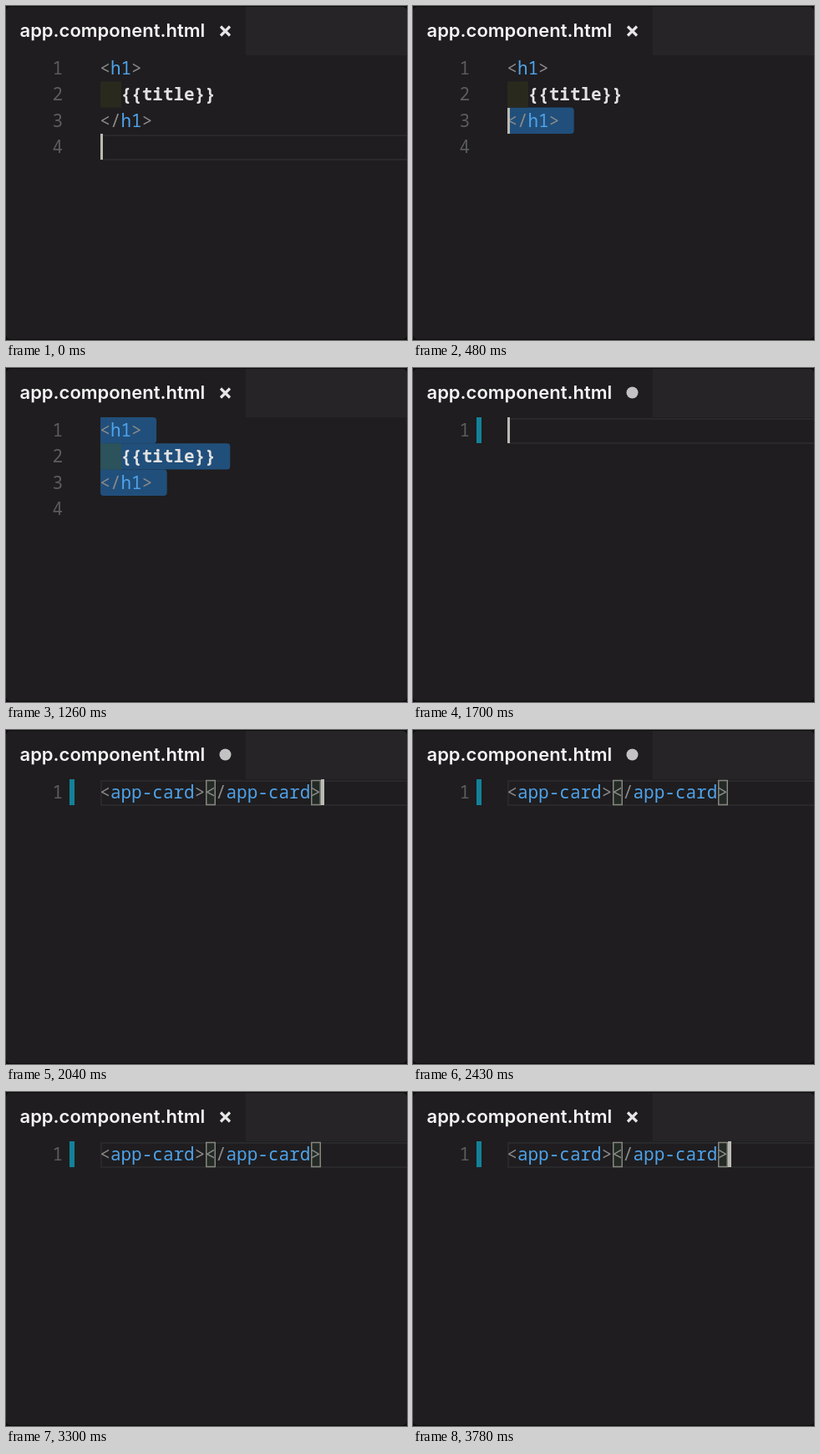
Recreate the animation shown at these times as an HTML page with a canvas. Size 480 px wide and 400 px high, loop 3.82 s.

```html
<!DOCTYPE html>
<html lang="en">
<head>
<meta charset="utf-8">
<title>Editor</title>
<style>
  html, body { margin: 0; width: 100%; height: 100%; overflow: hidden; background: #1f1d1f; }
  canvas { display: block; width: 480px; height: 400px; }
</style>
</head>
<body>
<canvas id="stage" width="480" height="400"></canvas>
<script>
const ctx = document.getElementById('stage').getContext('2d');
const LOOP = 3820, BLINK = 500;
const LEFT = 113, TOP = 59, ROW = 31.3, CHAR = 12.6;
const MONO = '"Noto Sans Mono", "DejaVu Sans Mono", monospace';
const GRAY = '#8b8b8b', BLUE = '#4fa3ea', WHITE = '#e2e2e2';

// Key moments in ms
const PICK = [400, 530, 650];
const CUT = 1500, MARK = 1700, PASTE = 1750, SAVE = 2500;

const MARKUP = [
  [['<', GRAY], ['h1', BLUE], ['>', GRAY]],
  [['  ', WHITE], ['{{title}}', WHITE, 600]],
  [['</', GRAY], ['h1', BLUE], ['>', GRAY]],
  []
];
const CARD = [
  ['<', GRAY], ['app-card', BLUE], ['></', GRAY], ['app-card', BLUE], ['>', GRAY]
];

const rowY = row => TOP + row * ROW;
const colX = col => LEFT + col * CHAR;
const lengthOf = parts => parts.reduce((n, [text]) => n + text.length, 0);

function rect(x, y, w, h, color) {
  ctx.fillStyle = color;
  ctx.fillRect(x, y, w, h);
}

function label(text, x, y, color, font, align = 'left') {
  ctx.font = font;
  ctx.fillStyle = color;
  ctx.textAlign = align;
  ctx.fillText(text, x, y);
}

function codeLine(parts, row) {
  let col = 0;
  for (const [text, color, weight = 500] of parts) {
    label(text, colX(col) - 0.7, rowY(row) + 23, color, `${weight} 21px ${MONO}`);
    col += text.length;
  }
}

function lineNumber(row) {
  label(row + 1, 68, rowY(row) + 23, '#5c5c5d', `21px ${MONO}`, 'right');
}

function activeLine(row) {
  ctx.strokeStyle = '#29282a';
  ctx.lineWidth = 2;
  ctx.strokeRect(LEFT + 1, Math.round(rowY(row)) + 2, 400, 29);
}

function caret(col, row, width, since, t) {
  if (Math.floor((t - since) / BLINK) % 2 === 0) {
    rect(Math.floor(colX(col)), Math.round(rowY(row)), width, 31, '#babbb4');
  }
}

function selection(row) {
  const width = lengthOf(MARKUP[row]) * CHAR + 16.7;
  ctx.fillStyle = '#214f7b';
  ctx.beginPath();
  ctx.roundRect(LEFT, rowY(row), width, ROW, [0, 4, 4, row === 2 ? 4 : 0]);
  ctx.fill();
}

function bracketBox(col) {
  const x = Math.round(colX(col));
  rect(x, 60, 12, 30, '#232a25');
  ctx.strokeStyle = '#85877f';
  ctx.lineWidth = 1.5;
  ctx.strokeRect(x + 0.75, 60.5, 10.5, 29);
}

function tabBar(dirty) {
  rect(287, 0, 193, 59, '#262427');
  label('app.component.html', 16.5, 36.5, '#f4f4f4', '600 22px Inter, Roboto, sans-serif');
  if (dirty) {
    ctx.fillStyle = '#c3c3c4';
    ctx.beginPath();
    ctx.arc(262.5, 29.5, 7, 0, Math.PI * 2);
    ctx.fill();
    return;
  }
  ctx.strokeStyle = '#e6e6e6';
  ctx.lineWidth = 3.2;
  ctx.beginPath();
  ctx.moveTo(257, 24.5);
  ctx.lineTo(268, 35.5);
  ctx.moveTo(268, 24.5);
  ctx.lineTo(257, 35.5);
  ctx.stroke();
}

function windowEdge() {
  ctx.fillStyle = '#0c0c0d';
  ctx.beginPath();
  ctx.rect(0, 0, 480, 400);
  ctx.roundRect(0, 1, 480, 398, 5);
  ctx.fill('evenodd');
}

function beforeCut(t) {
  const picked = PICK.filter(time => t >= time).length;
  const row = 3 - picked;
  if (!picked) activeLine(row);
  for (let r = row; r < 3; r++) selection(r);
  rect(LEFT, rowY(1), 25, ROW, row <= 1 ? '#2c525b' : '#2a291e');
  MARKUP.forEach((parts, r) => {
    lineNumber(r);
    codeLine(parts, r);
  });
  caret(0, row, 3, picked ? PICK[picked - 1] : 0, t);
}

function afterCut(t) {
  const pasted = t >= PASTE;
  activeLine(0);
  lineNumber(0);
  if (t >= MARK) rect(76, TOP, 6, 31, '#13819a');
  if (pasted) {
    bracketBox(10);
    bracketBox(20);
    codeLine(CARD, 0);
    caret(lengthOf(CARD), 0, 4, PASTE, t);
  } else {
    caret(0, 0, 3, CUT, t);
  }
}

function draw(t) {
  rect(0, 0, 480, 400, '#1f1d1f');
  tabBar(t >= CUT && t < SAVE);
  if (t < CUT) beforeCut(t);
  else afterCut(t);
  windowEdge();
}

let start;
function tick(now) {
  start ??= now;
  draw((now - start) % LOOP);
  requestAnimationFrame(tick);
}
draw(0);
requestAnimationFrame(tick);
</script>
</body>
</html>
```
